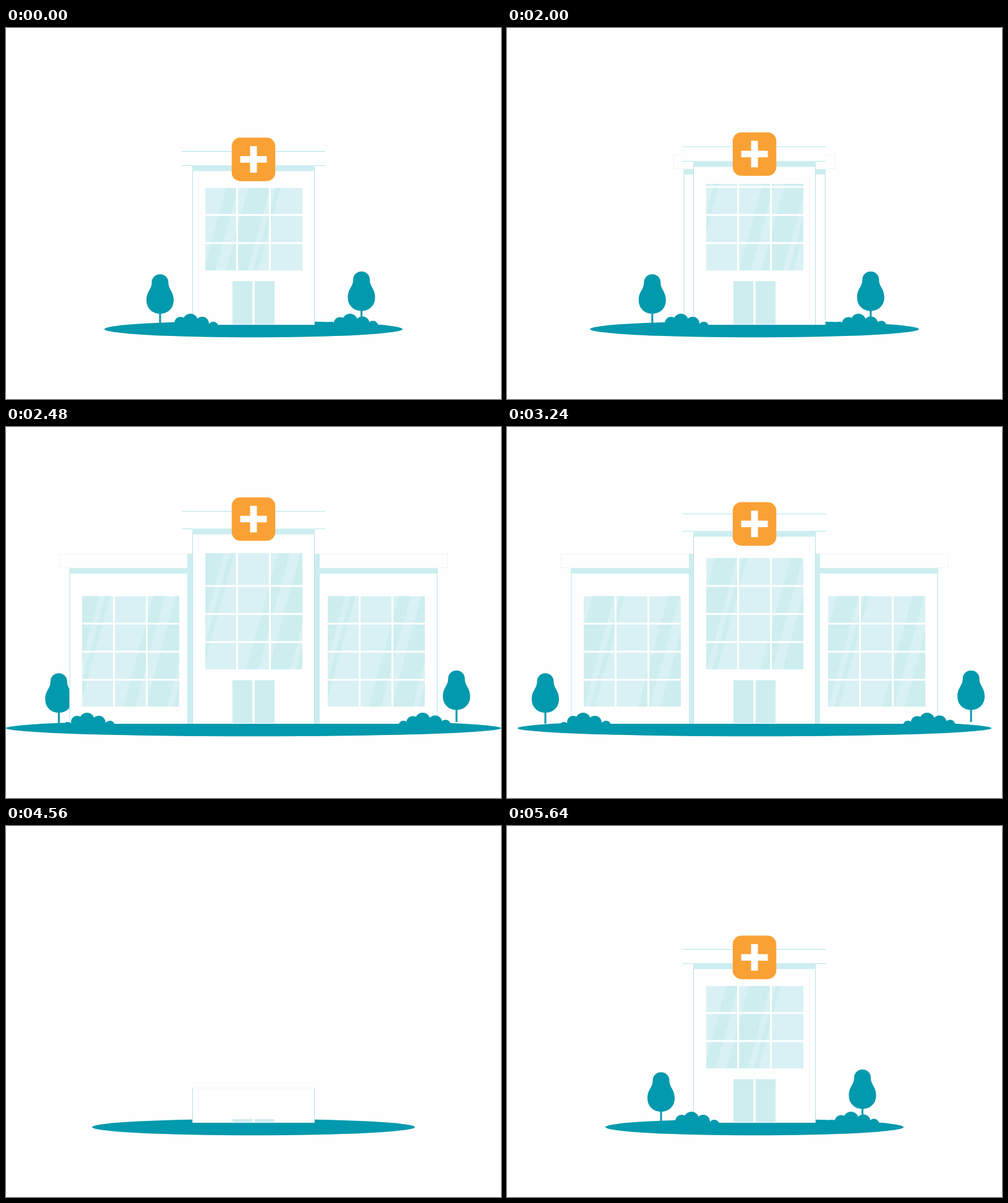
An HTML page with a canvas that plays this animation: 800x600 px, repeating every 5680 ms.

```html
<!DOCTYPE html>
<html lang="en">
<head>
<meta charset="utf-8">
<title>Growing hospital</title>
<style>
html, body { margin: 0; width: 100%; height: 100%; overflow: hidden; background: #fff; }
canvas { display: block; width: 800px; height: 600px; }
</style>
</head>
<body>
<canvas id="stage" width="800" height="600"></canvas>
<script>
const ctx = document.getElementById('stage').getContext('2d');
const LOOP = 5680, STEP = 40, CUT = 4320;
const TEAL = '#0099ad', WALL = '#fefefe', MINT = '#cdedef', PALE = '#d9f1f4';
const LINE = '#b0e4e8', FAINT = '#e9f5f6', ORANGE = '#f9a134';

// Smooth curve through [time, value] points, flat at both ends.
function key(t, pts) {
  const n = pts.length - 1;
  if (t <= pts[0][0]) return pts[0][1];
  if (t >= pts[n][0]) return pts[n][1];
  let i = 0;
  while (t > pts[i + 1][0]) i++;
  const slope = k => k <= 0 || k >= n ? 0 :
    (pts[k + 1][1] - pts[k - 1][1]) / (pts[k + 1][0] - pts[k - 1][0]);
  const [ta, a] = pts[i], [tb, b] = pts[i + 1];
  const d = tb - ta, u = (t - ta) / d, u2 = u * u, u3 = u2 * u;
  return a * (2 * u3 - 3 * u2 + 1) + b * (3 * u2 - 2 * u3) +
    d * (slope(i) * (u3 - 2 * u2 + u) + slope(i + 1) * (u3 - u2));
}

const mix = (a, b, p) => a + (b - a) * p;

// Widening: start, two mid values, overshoot, rest.
const widen = (t, mid, late, peak, end = 2920) =>
  key(t, [[1860, 0], [2200, mid], [2480, late], [2580, peak], [end, 1]]);

// Pop-in with an overshoot.
const pop = (t, start, peak, end, over) =>
  key(t, [[start, 0], [peak, over], [end, 1]]);

function box(x, y, w, h, color) {
  if (w <= 0 || h <= 0) return;
  ctx.fillStyle = color;
  ctx.fillRect(x, y, w, h);
}

function disc(x, y, r) {
  ctx.beginPath();
  ctx.arc(x, y, r, 0, 2 * Math.PI);
  ctx.fill();
}

function scaled(x, y, s, draw) {
  if (s <= 0) return;
  ctx.save();
  ctx.translate(x, y);
  ctx.scale(s, s);
  draw();
  ctx.restore();
}

function ground(half) {
  if (half <= 0) return;
  ctx.fillStyle = TEAL;
  ctx.beginPath();
  ctx.ellipse(400, 487, half, 13.3, 0, 0, 2 * Math.PI);
  ctx.fill();
}

// Origin at the foot of the trunk; h is the height of the tree top.
function tree(x, foot, h, s) {
  scaled(x, foot, s, () => {
    box(-1.5, 60 - h, 3, h - 60, TEAL);
    const y = -h;
    ctx.fillStyle = TEAL;
    ctx.beginPath();
    ctx.moveTo(-13.5, y + 14);
    ctx.bezierCurveTo(-13.5, y - 4.5, 13.5, y - 4.5, 13.5, y + 14);
    ctx.bezierCurveTo(13.5, y + 25, 22, y + 28, 22, y + 42);
    ctx.bezierCurveTo(22, y + 71.5, -22, y + 71.5, -22, y + 42);
    ctx.bezierCurveTo(-22, y + 28, -13.5, y + 25, -13.5, y + 14);
    ctx.fill();
  });
}

const LEFT_BUSH = [[-31, 4, 7], [-16, -3, 10], [0, -6, 12], [19, -2, 11], [37, 3, 8]];
const RIGHT_BUSH = [[-31, 3, 8], [-16, -2, 10.5], [0, -6, 12], [20, -2, 11.5], [37, 2, 8.5], [53, 6, 5.5]];

function bush(x, bumps, s) {
  scaled(x, 480, s, () => {
    ctx.fillStyle = TEAL;
    for (const [dx, dy, r] of bumps) disc(dx, dy, r);
  });
}

// Glass front, three panes wide, with a slanted sheen that drifts right.
function glass(x, top, bottom, firstBar, bars, t) {
  const w = 157, h = bottom - top;
  if (h <= 0) return;
  ctx.save();
  ctx.beginPath();
  ctx.rect(x, top, w, h);
  ctx.clip();
  box(x, top, w, h, PALE);
  ctx.fillStyle = MINT;
  const y0 = bottom - 190, y1 = bottom, lean = 0.27 * 190;
  const drift = t / LOOP * 158;
  for (let k = -1; k < 3; k++) {
    for (const [a, b] of [[34, 53], [70, 105], [114, 122]]) {
      const l = x + a + drift + 15 + (k - 1) * 158, r = l + b - a;
      ctx.beginPath();
      ctx.moveTo(l, y0);
      ctx.lineTo(r, y0);
      ctx.lineTo(r - lean, y1);
      ctx.lineTo(l - lean, y1);
      ctx.fill();
    }
  }
  for (let i = 1; i < 3; i++) box(x + 53 * i - 3, top, 3, h, WALL);
  for (let i = 0; i < bars; i++) box(x, firstBar + 45.4 * i - 1.5, w, 3, WALL);
  ctx.restore();
}

function wing(side, p, t) {
  const outer = 400 + side * mix(98.5, 296.5, p);
  const span = (a, b) => {
    const xa = outer - side * a, xb = outer - side * b;
    return [Math.min(xa, xb), Math.abs(xb - xa)];
  };
  const bar = (a, b, y, h, color) => {
    const [x, w] = span(a, b);
    box(x, y, w, h, color);
  };
  bar(0, 198, 228, 252, WALL);
  bar(0, 1, 228, 252, LINE);
  bar(0, 191, 228, 9, MINT);
  bar(-16.5, 191, 205, 23, WALL);
  bar(-16.5, 191, 205, 1, FAINT);
  bar(-16.5, -15.5, 205, 23, FAINT);
  bar(-16.5, 0, 227, 1, FAINT);
  glass(span(20.5, 177.5)[0], 273.5, 452.5, 318, 3, t);
  bar(190.5, 200, 205, 275, MINT);
}

function sign(y, s) {
  scaled(400, y, s, () => {
    ctx.fillStyle = ORANGE;
    ctx.beginPath();
    ctx.roundRect(-35.2, -35.2, 70.4, 70.4, 14);
    ctx.fill();
    box(-5.5, -21.5, 11, 43, '#fff');
    box(-21.5, -5.3, 43, 10.6, '#fff');
  });
}

function main(s, t) {
  const { top, roofTop, roof, glassTop, door } = s;
  box(301, top, 198, 480 - top, WALL);
  if (top < 479) {
    box(301, top, 1, 480 - top, LINE);
    box(498, top, 1, 480 - top, LINE);
    box(301, top, 198, 1, FAINT);
  }
  if (roof > 0) {
    const half = 116 * roof;
    box(301, top, 198, 9.5 * Math.min(1, roof), MINT);
    box(400 - half, roofTop, 2 * half, top - roofTop, WALL);
    box(400 - half, roofTop, 2 * half, 1, LINE);
    if (half > 99) {
      box(400 - half, top, half - 99, 1, LINE);
      box(499, top, half - 99, 1, LINE);
    }
  }
  glass(322, glassTop, 392, 257, 3, t);
  const h = 69.5 * door;
  box(366, 479 - h, 32.3, h, MINT);
  box(401.7, 479 - h, 32.3, h, MINT);
}

function state(t) {
  if (t < CUT) {
    const roofRise = widen(t, 0.505, 1.07, 1.09);
    return {
      half: mix(241, 383, widen(t, 0.64, 1.12, 1.13)),
      treeMove: widen(t, 0.335, 0.875, 0.99, 2840),
      bushMove: widen(t, 0.404, 0.955, 1.03),
      wings: widen(t, 0.37, 1.005, 1.03),
      top: mix(222, 168, roofRise),
      roofTop: mix(199, 140, roofRise),
      roof: 1,
      glassTop: mix(258.5, 212, widen(t, 0.55, 1.17, 1.19)),
      door: 1,
      signY: mix(212.5, 156.7, widen(t, 0.59, 1.14, 1.19)),
      signSize: 1, treeSize: 1, bushSize: 1
    };
  }
  const rise = key(t, [[4480, 0], [4560, 0.22], [4760, 0.95], [4880, 1.09], [5120, 1]]);
  const top = 480 - 258 * rise;
  const roof = pop(t, 4640, 4880, 5040, 1.02);
  return {
    half: key(t, [[CUT, 0], [4500, 250], [4560, 261], [4820, 241]]),
    treeMove: 0, bushMove: 0, wings: 0,
    top, roof,
    roofTop: top - 23 * Math.min(1, roof),
    glassTop: 392 - 133.5 * pop(t, 4620, 4960, 5160, 1.06),
    door: key(t, [[4530, 0], [4560, 0.07], [4760, 1.03], [4880, 1]]),
    signY: top - 9.5,
    signSize: pop(t, 4700, 4920, 5080, 1.06),
    treeSize: pop(t, 4740, 5040, 5360, 1.2),
    bushSize: pop(t, 4700, 4980, 5280, 1.18)
  };
}

function draw(t) {
  const s = state(t);
  box(0, 0, 800, 600, '#fefefe');
  ground(s.half);
  tree(mix(249, 62, s.treeMove), 480, 82, s.treeSize);
  tree(mix(574.5, 750, s.treeMove), 477, 83.5, s.treeSize);
  if (s.wings > 0) {
    wing(-1, s.wings, t);
    wing(1, s.wings, t);
  }
  main(s, t);
  sign(s.signY, s.signSize);
  bush(mix(298, 123, s.bushMove), LEFT_BUSH, s.bushSize);
  bush(mix(556, 679, s.bushMove), RIGHT_BUSH, s.bushSize);
}

const start = performance.now();
function frame() {
  const t = (performance.now() - start) % LOOP;
  draw(Math.floor(t / STEP) * STEP);
  requestAnimationFrame(frame);
}
frame();
</script>
</body>
</html>
```
